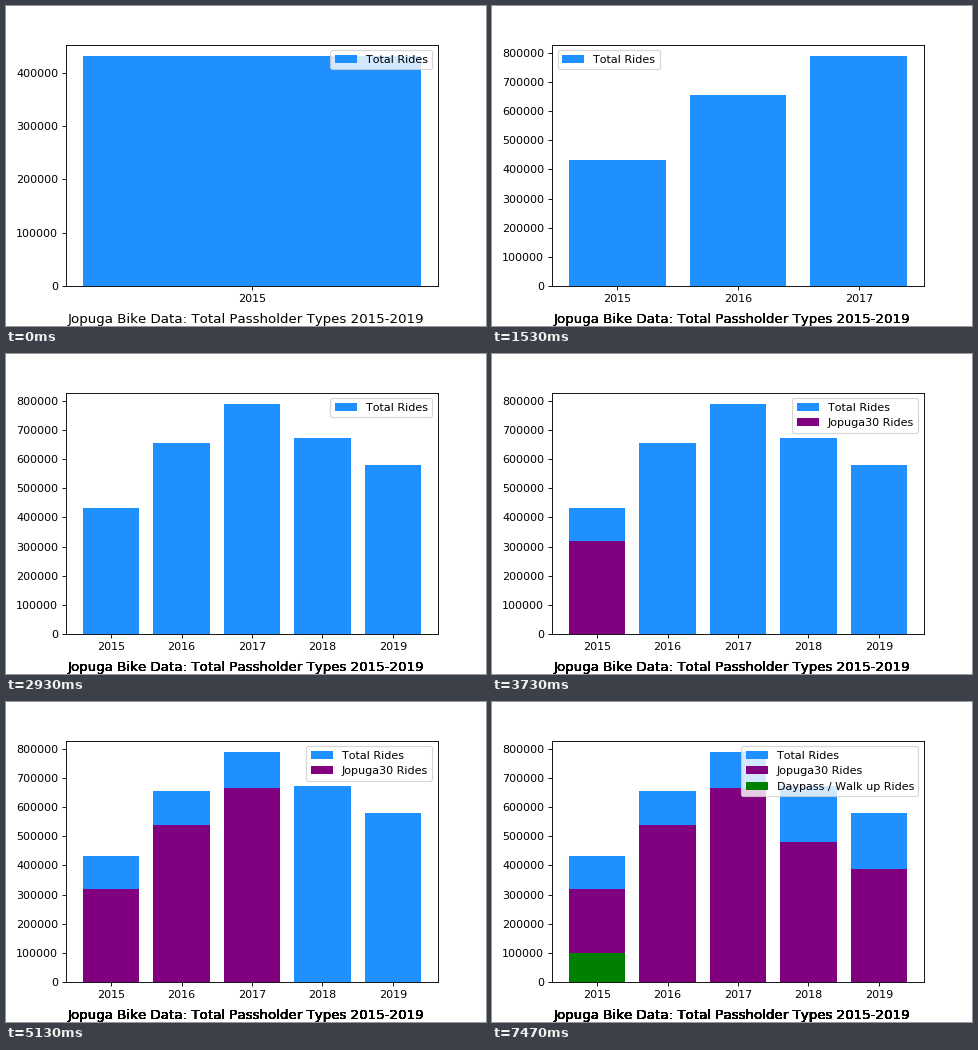
Recreate the animation shown at these times as a matplotlib script. Size 480 px wide and 320 px high, loop 8 s.

```python
import matplotlib.pyplot as plt
from matplotlib.animation import FuncAnimation
from matplotlib.ticker import MultipleLocator

LOOP_MS = 8000
INTERVAL = 40
STEP_MS = 2200 / 3  # one new bar per step
STEPS = 11

YEARS = ["2015", "2016", "2017", "2018", "2019"]
SERIES = [
    ("Total Rides", "dodgerblue", [431000, 655000, 789000, 672500, 579500]),
    ("Jopuga30 Rides", "purple", [319500, 538500, 667000, 480000, 388500]),
    ("Daypass / Walk up Rides", "green", [99500]),
]
TITLE = "Jopuga Bike Data: Total Passholder Types 2015-2019"

plt.rcParams.update({
    "font.family": "DejaVu Sans",
    "font.size": 10,
    "text.kerning_factor": 6,  # classic, unkerned letter spacing
})
fig = plt.figure(figsize=(6, 4), dpi=80, facecolor="white")


def build_chart(step):
    """Bar chart holding the first step + 1 bars, series after series."""
    ax = fig.add_axes([0.125, 0.125, 0.775, 0.7545], label=f"step {step}")
    left = step + 1
    for label, color, values in SERIES:
        shown = values[:left]
        if not shown:
            break
        ax.bar(YEARS[:len(shown)], shown, color=color, label=label)
        left = max(0, left - len(shown))
    ax.yaxis.set_major_locator(MultipleLocator(100000))
    ax.legend(loc="upper left" if 1 <= step <= 3 else "upper right")
    return ax


charts = [build_chart(step) for step in range(STEPS)]

# The title is stamped again at every step, so its edges grow heavier.
titles = [fig.text(0.5, 0.01, TITLE, ha="center", fontsize=12)
          for _ in range(STEPS)]


def update(i):
    step = int((i + 0.5) * INTERVAL / STEP_MS)
    for k, (ax, title) in enumerate(zip(charts, titles)):
        ax.set_visible(k == step)
        title.set_visible(k <= step)
    return charts + titles


anim = FuncAnimation(fig, update, frames=LOOP_MS // INTERVAL,
                     interval=INTERVAL, repeat=True, repeat_delay=0)
plt.show()
```
